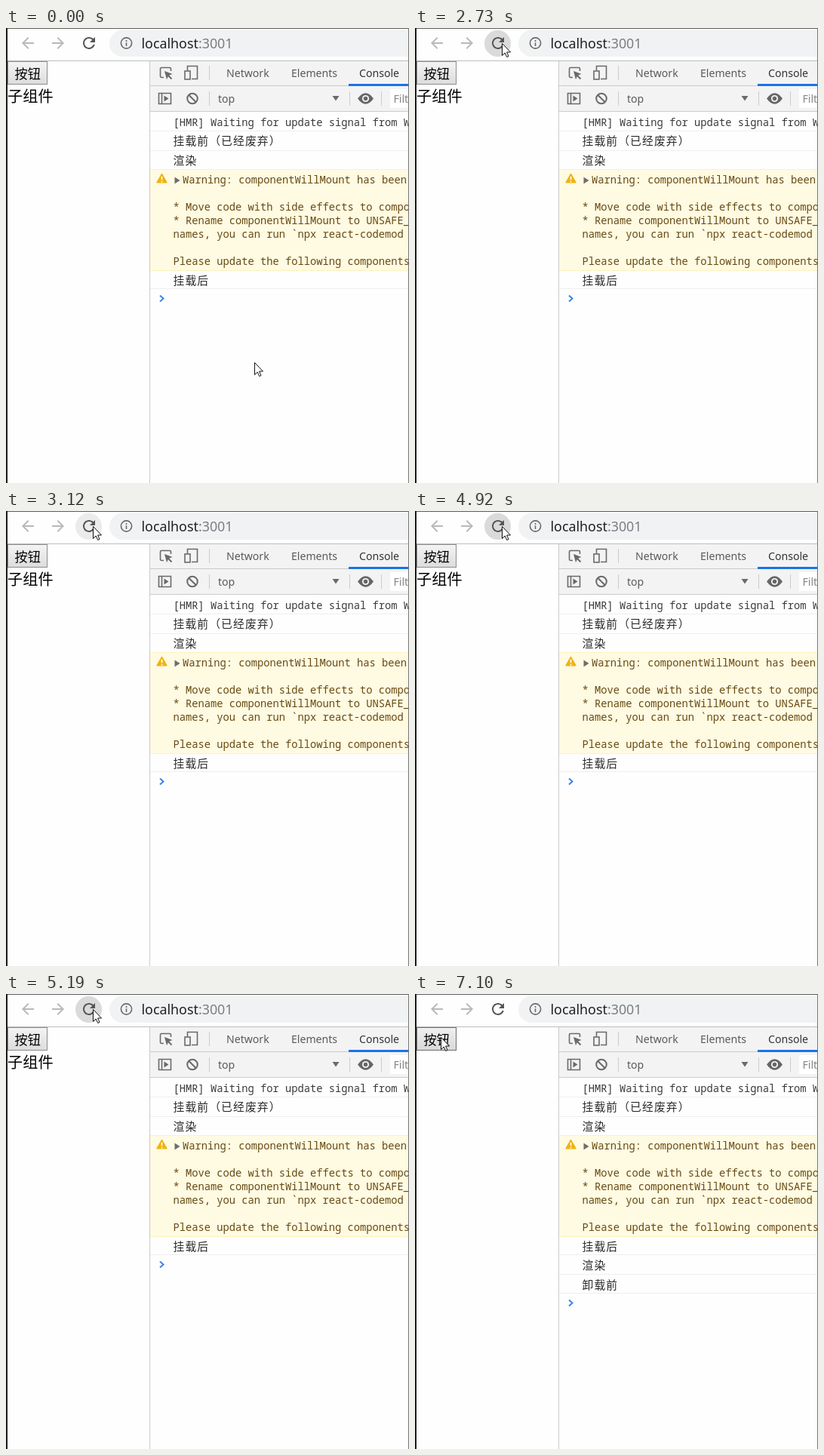
These frames come from a looping animation (534x603 px, 8000 ms). An HTML page:

```html
<!DOCTYPE html>
<html lang="zh-CN">
<head>
<meta charset="utf-8">
<title>Component lifecycle</title>
<style>
html, body { margin: 0; width: 100%; height: 100%; overflow: hidden; background: #fff; }
svg { display: block; width: 534px; height: 603px; }
text { white-space: pre; }
.ui { font: 14.1px "Noto Sans", "Open Sans", sans-serif; fill: #5a5a5a; }
.url { font-size: 17.85px; fill: #202124; }
.mono { font: 13.75px "Noto Sans Mono", "DejaVu Sans Mono", monospace; fill: #3a3a3a; }
.cjk { font: 14.8px "Noto Sans CJK SC", "Noto Sans CJK", sans-serif; letter-spacing: 1.1px; fill: #2a2a2a; }
.paren { font-family: "Noto Sans CJK TC", "Noto Sans CJK SC", sans-serif; }
.page { font: 350 20.2px "Noto Sans CJK SC", "Noto Sans CJK", sans-serif; fill: #000; }
.warn { fill: #674a12; }
.line { fill: none; stroke: #6a6a6a; stroke-width: 1.6; }
.bold { stroke-width: 2; }
</style>
</head>
<body>
<svg viewBox="0 0 534 603">
  <defs>
    <linearGradient id="face" x2="0" y2="1">
      <stop id="faceTop" stop-color="#f4f4f4"/>
      <stop id="faceEnd" offset="1" stop-color="#dcdcdc"/>
    </linearGradient>
    <path id="arrow" d="M8-1H-4.17L1.42-6.59 0-8-8 0 0 8 1.41 6.59-4.17 1H8z"/>
  </defs>
  <rect width="534" height="603" fill="#fefefe"/>

  <!-- browser bar -->
  <use href="#arrow" x="29" y="20" fill="#b9b9b9"/>
  <use href="#arrow" transform="translate(69 20) scale(-1 1)" fill="#b9b9b9"/>
  <circle id="halo" cx="109.5" cy="20.5" r="17.5"/>
  <path transform="translate(98 8)" fill="#555" d="M17.65 6.35C16.2 4.9 14.21 4 12 4c-4.42 0-7.99 3.58-7.99 8s3.57 8 7.99 8c3.73 0 6.84-2.55 7.73-6h-2.08c-.82 2.33-3.04 4-5.65 4-3.31 0-6-2.69-6-6s2.69-6 6-6c1.66 0 3.14.69 4.22 1.78L13 11h7V4z"/>
  <rect x="137" y="3" width="430" height="35" rx="17.5" fill="#f1f2f3"/>
  <circle cx="159.5" cy="20" r="7.1" class="line"/>
  <path d="M159.5 16v2M159.5 19.2v4.8" class="line"/>
  <text class="ui url" x="179.5" y="27">localhost<tspan fill="#7a7d81">:3001</tspan></text>
  <path d="M0 43.5H534" stroke="#bdbdbd"/>

  <!-- page -->
  <g id="page">
    <rect id="button" x="2.5" y="44.5" width="52" height="30" fill="url(#face)"/>
    <text class="page" x="11.5" y="66.5" style="font-size:17.2px">按钮</text>
    <text id="child" class="page" x="2" y="97.5">子组件</text>
  </g>

  <!-- developer tools -->
  <rect x="191" y="44" width="343" height="66" fill="#f3f3f3"/>
  <path d="M190.5 44V603M191 76.5H534M191 110.5H534" stroke="#cbcbcb"/>
  <path d="M269.5 50V69M269.5 84V103M455.5 84V103M497.5 84V103" stroke="#ccc"/>
  <rect x="454" y="74" width="80" height="3" fill="#1a73e8"/>
  <path class="line" d="M209 65.5H206Q204.5 65.5 204.5 64V54Q204.5 52.5 206 52.5H217Q218.5 52.5 218.5 54V57"/>
  <path fill="#6a6a6a" d="M210 57l10.5 4-4.3 1.8 4 4-1.4 1.4-4-4-1.8 4z"/>
  <path class="line" d="M240.5 56V50.5H253.5V67.5H246"/>
  <rect class="line" x="237" y="57" width="7" height="11"/>
  <text class="ui" x="292" y="65">Network</text>
  <text class="ui" x="378" y="65">Elements</text>
  <text class="ui" x="468" y="65" style="fill:#333">Console</text>

  <path class="line" d="M202.5 86.5H218.5V100.5H202.5ZM206.5 86V101"/>
  <path d="M209.5 89.5V97.5L215.5 93.5z" fill="#6a6a6a"/>
  <circle class="line bold" cx="247" cy="93.5" r="6.8"/>
  <path class="line bold" d="M242.2 88.7L251.8 98.3"/>
  <text class="ui" x="281" y="98.5">top</text>
  <path d="M432.5 90H441.5L437 96.5z" fill="#6a6a6a"/>
  <path d="M466 93.5Q476.5 79 487 93.5 476.5 108 466 93.5z" fill="#666"/>
  <circle cx="476.5" cy="93.5" r="4.6" fill="#f3f3f3"/>
  <circle cx="476.5" cy="93.5" r="2.7" fill="#666"/>
  <rect x="509" y="81" width="25" height="25" fill="#fff"/>
  <text class="ui" x="513.5" y="98.5" style="fill:#858585">Filter</text>

  <!-- console -->
  <g id="hmr">
    <text class="mono" x="221.5" y="130">[HMR] Waiting for update signal from WDS...</text>
    <path d="M191 136.5H534" stroke="#efefef"/>
  </g>
  <g id="log">
    <text class="cjk" x="221.5" y="155">挂载前<tspan class="paren">（</tspan>已经废弃<tspan class="paren">）</tspan></text>
    <path d="M191 162.5H534M191 345.5H534" stroke="#efefef"/>
    <text class="cjk" x="221.5" y="181">渲染</text>
    <rect x="191" y="187" width="343" height="135" fill="#fffae2"/>
    <path d="M191 187.5H534M191 321.5H534" stroke="#fdf1c0"/>
    <g transform="translate(0 -.8)">
      <path d="M206.5 194.5L212.8 205.5H200.2z" fill="#efb310" stroke="#efb310" stroke-width="1.6" stroke-linejoin="round"/>
      <path d="M206.5 197.5V202M206.5 203.5V205.2" stroke="#fff" stroke-width="1.7"/>
    </g>
    <path d="M223.5 197.5V206.5L230.5 202z" fill="#6e6e6e"/>
    <g id="warning"></g>
    <text class="cjk" x="221.5" y="340">挂载后</text>
  </g>
  <g id="more">
    <text class="cjk" x="221.5" y="365">渲染</text>
    <text class="cjk" x="221.5" y="391">卸载前</text>
    <path d="M191 371.5H534M191 396.5H534" stroke="#efefef"/>
  </g>
  <path id="prompt" d="M204-4L208.5 0 204 4" fill="none" stroke="#3b83ea" stroke-width="2"/>

  <path id="cursor" d="M.5.5V16.5L4.2 13 6.7 18.5 9 17.5 6.6 12H11.5z" fill="#fff" stroke="#111"/>
  <path d="M0 .5H534" stroke="#5c5c5c"/>
  <path d="M533.5 0V603" stroke="#777"/>
  <rect width="2" height="603" fill="#1e1e1e"/>
</svg>
<script>
const LOOP = 8000;
const $ = id => document.getElementById(id);
const show = (id, on) => $(id).setAttribute('visibility', on ? 'visible' : 'hidden');
const set = (id, name, value) => $(id).setAttribute(name, value);

const warning = [
  [234, 206, 'Warning: componentWillMount has been renamed'],
  [221.5, 242, '* Move code with side effects to componentDidMount'],
  [221.5, 260, '* Rename componentWillMount to UNSAFE_componentWillMount'],
  [221.5, 278, 'names, you can run `npx react-codemod rename'],
  [221.5, 314, 'Please update the following components:']
];
$('warning').innerHTML = warning.map(([x, y, s]) =>
  `<text class="mono warn" x="${x}" y="${y}">${s}</text>`).join('');

const pointer = [
  [0, 329, 443], [1370, 310, 425], [1490, 226, 383], [1640, 236, 262],
  [1760, 249, 120], [1910, 139, 12], [2060, 122, 14], [2190, 109, 17],
  [2310, 104, 19], [2460, 112, 20], [2580, 115, 20], [5730, 112, 24],
  [5850, 100, 32], [5970, 87, 39], [6090, 76, 44], [6240, 50, 52], [6360, 34, 57]
];
const halo = [
  [0, 'none'], [2460, '#ebebeb'], [2730, '#dadada'], [2990, '#ebebeb'],
  [4920, '#dadada'], [5850, '#ebebeb'], [5970, '#f4f4f4'], [6240, 'none']
];
// Rows in the console: 0 empty, 1 first line, 2 mounted, 3 unmounted
const rows = [[0, 2], [2990, 0], [3120, 2], [5050, 1], [5190, 2], [7100, 3]];
const button = [
  [0, '#f4f4f4', '#dcdcdc', '#8c8c8c'],
  [6240, '#f0f0f0', '#d8d8d8', '#6e6e6e'],
  [6950, '#dcdcdc', '#f0f0f0', '#6e6e6e'],
  [7100, '#f0f0f0', '#d8d8d8', '#6e6e6e']
];
const promptY = [123, 149, 358.5, 409.5];

const at = (track, t) => track.findLast(key => key[0] <= t).slice(1);

function draw(t) {
  const [x, y] = at(pointer, t);
  const [count] = at(rows, t);
  const [top, end, edge] = at(button, t);
  set('cursor', 'transform', `translate(${x} ${y})`);
  set('halo', 'fill', at(halo, t)[0]);
  set('faceTop', 'stop-color', top);
  set('faceEnd', 'stop-color', end);
  set('button', 'stroke', edge);
  $('page').style.display = count ? '' : 'none';
  show('child', count < 3);
  show('hmr', count > 0);
  show('log', count > 1);
  show('more', count > 2);
  set('prompt', 'transform', `translate(0 ${promptY[count]})`);
}

const start = performance.now();
function tick() {
  draw((performance.now() - start) % LOOP);
  requestAnimationFrame(tick);
}
tick();
</script>
</body>
</html>
```
